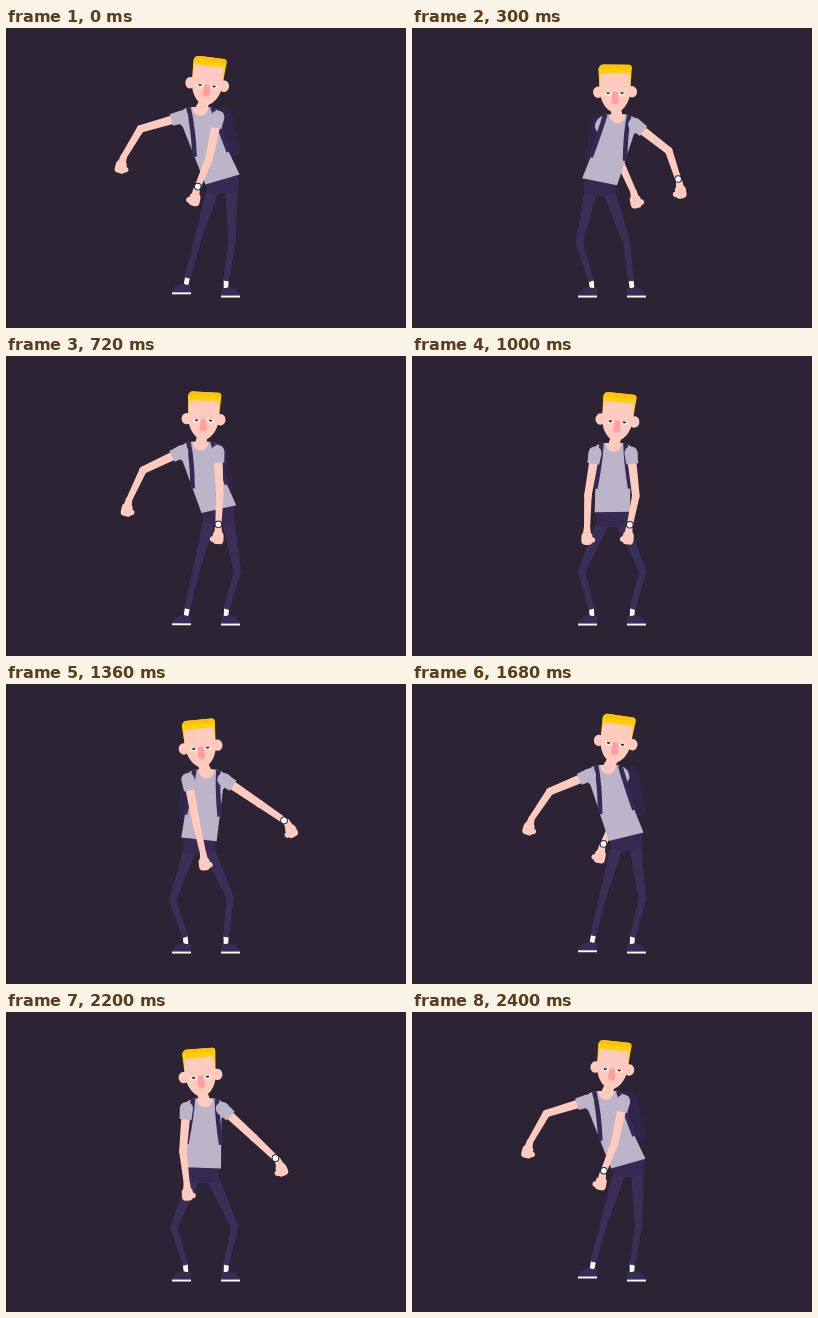
Animation, 400 px wide and 300 px high, one loop 2.42 s. Source, as an HTML page with a canvas:

```html
<!DOCTYPE html>
<html lang="en">
<head>
<meta charset="utf-8">
<title>Dance loop</title>
<style>
html, body { margin: 0; width: 100%; height: 100%; overflow: hidden; background: #2c2335; }
canvas { display: block; width: 400px; height: 300px; }
</style>
</head>
<body>
<canvas id="stage"></canvas>
<script>
const LOOP = 2420, SWINGS = 3;
const C = {
  bg: '#2c2335', skin: '#ffcbbf', nose: '#ff9fa2', hair: '#ffcf08', hairTop: '#ffc008',
  shirt: '#bcb4c8', leg: '#3a2f57', hips: '#352a51', pack: '#30264a', strap: '#342a53',
  shoe: '#372c56', dark: '#2b2237'
};

// Keys: [phase in degrees, upper arm, forearm]; angles from straight down, outward positive.
const WATCH_ARM = [[0, -12, -22], [25, -13, -25], [86, 6, -12], [134, 52, 18], [164, 56.5, 58],
  [200, 60, 62], [247, 56, 56], [321, 3, -2], [351, -12, -21]];
const PLAIN_ARM = [[0, 74, 31], [25, 71, 34], [60, 38, 26], [86, 10, 2], [134, -14, -12],
  [164, -36, -37], [200, -37, -39], [247, -11, -13], [284, 30, 2], [321, 64, 25], [351, 73, 30]];
const BOB = [[0, 0], [30, 2], [60, 6], [86, 8], [134, 7.5], [164, 1], [180, 0],
  [215, 3], [247, 6.5], [280, 8], [321, 6.8], [351, 0]];

const cvs = document.getElementById('stage');
const g = cvs.getContext('2d');
const dpr = window.devicePixelRatio || 1;
cvs.width = 400 * dpr;
cvs.height = 300 * dpr;

const rad = d => d * Math.PI / 180;
const cosd = d => Math.cos(rad(d));
const sind = d => Math.sin(rad(d));
const mix = (p, q, k) => [p[0] + (q[0] - p[0]) * k, p[1] + (q[1] - p[1]) * k];
const polar = (p, side, deg, len) => [p[0] + side * sind(deg) * len, p[1] + cosd(deg) * len];

// Smooth periodic curve through the keys, flat at turning points.
function sample(keys, phase, col) {
  const n = keys.length;
  const at = i => {
    const turn = Math.floor(i / n), k = keys[i - turn * n];
    return [k[0] + turn * 360, k[col]];
  };
  const slope = i => {
    const [a, b, c] = [at(i - 1), at(i), at(i + 1)];
    if ((b[1] - a[1]) * (c[1] - b[1]) <= 0) return 0;
    return (c[1] - a[1]) / (c[0] - a[0]);
  };
  let i = n - 1;
  while (keys[i][0] > phase) i--;
  const [x0, y0] = at(i), [x1, y1] = at(i + 1);
  const h = x1 - x0, u = (phase - x0) / h, v = 1 - u;
  return y0 * v * v * (1 + 2 * u) + y1 * u * u * (3 - 2 * u)
    + h * u * v * (slope(i) * v - slope(i + 1) * u);
}

function fill(color, draw) {
  g.fillStyle = color;
  g.beginPath();
  draw();
  g.fill();
}
function poly(color, pts) {
  fill(color, () => pts.forEach(p => g.lineTo(p[0], p[1])));
}
function oval(color, x, y, rx, ry = rx) {
  fill(color, () => g.ellipse(x, y, rx, ry, 0, 0, 7));
}
function limb(color, p, q, w0, w1) {
  const a = Math.atan2(q[1] - p[1], q[0] - p[0]);
  const nx = -Math.sin(a) / 2, ny = Math.cos(a) / 2;
  poly(color, [[p[0] + nx * w0, p[1] + ny * w0], [q[0] + nx * w1, q[1] + ny * w1],
    [q[0] - nx * w1, q[1] - ny * w1], [p[0] - nx * w0, p[1] - ny * w0]]);
}
function placed(x, y, deg, draw) {
  g.save();
  g.translate(x, y);
  g.rotate(rad(deg));
  draw();
  g.restore();
}

function arm(shoulder, side, upper, fore, watch) {
  const elbow = polar(shoulder, side, upper, 43);
  const wrist = polar(elbow, side, fore, 33);
  limb(C.skin, shoulder, elbow, 9, 7.5);
  oval(C.skin, elbow[0], elbow[1], 3.75);
  limb(C.skin, elbow, wrist, 7.5, 6);
  placed(wrist[0], wrist[1], -side * fore * 0.5, () => {
    fill(C.skin, () => g.roundRect(-5.5, 4, 11, 12.5, 4));
    limb(C.skin, [0, -2], [0, 7], 6, 8.5);
    oval(C.skin, -side * 5.2, 11.5, 3, 2.8);
  });
  if (watch) {
    const w = mix(elbow, wrist, 0.9);
    placed(w[0], w[1], -side * fore, () => {
      g.fillStyle = C.dark;
      g.fillRect(-4, -1.8, 8, 3.6);
    });
    oval(C.dark, w[0], w[1], 3.8);
    oval('#fff', w[0], w[1], 2.8);
  }
  oval(C.shirt, shoulder[0], shoulder[1], 6.6);
  limb(C.shirt, shoulder, polar(shoulder, side, upper, 11), 13, 12);
}

function leg(hip, side) {
  const A = 54.3, B = 42.2, x = 200 + side * 19.5;
  const reach = Math.hypot(x - hip[0], 256 - hip[1]);
  const lift = Math.max(0, reach - A - B); // a stretched leg pulls its foot up
  const foot = [x, 256 - lift];
  const dx = foot[0] - hip[0], dy = foot[1] - hip[1];
  const d = Math.min(Math.hypot(dx, dy), A + B - 0.01);
  const a = (d * d + A * A - B * B) / (2 * d);
  const dir = Math.atan2(dy, dx) - side * Math.acos(Math.min(1, a / A));
  const knee = [hip[0] + Math.cos(dir) * A, hip[1] + Math.sin(dir) * A];
  limb(C.leg, hip, knee, 12.5, 7.2);
  oval(C.leg, knee[0], knee[1], 3.6);
  limb('#fff', mix(knee, foot, 0.9), [x + side * 0.5, 260 - lift], 5, 4.6);
  limb(C.leg, knee, mix(knee, foot, 0.93), 7.2, 6);

  g.save();
  g.translate(200, -lift);
  g.scale(side, 1);
  fill(C.shoe, () => {
    g.moveTo(15.3, 259.5);
    g.quadraticCurveTo(19, 261, 23, 259);
    g.quadraticCurveTo(33, 261, 34, 268);
    g.lineTo(15, 268);
  });
  g.fillStyle = '#fff';
  g.fillRect(15, 267.6, 19, 1.9);
  g.restore();
}

function head(x, y, tilt) {
  placed(x, y, tilt, () => {
    oval(C.skin, -17, 0, 5, 5.7);
    oval(C.skin, 17, 0, 5, 5.7);
    const top = () => {
      g.quadraticCurveTo(-15, -28, -10, -27.5);
      g.lineTo(14, -27);
      g.quadraticCurveTo(17.5, -27, 17, -22.5);
    };
    fill(C.hair, () => {
      g.moveTo(-15.6, -5);
      g.lineTo(-16.3, -23);
      top();
      g.lineTo(15.6, -5);
    });
    fill(C.hairTop, () => {
      g.moveTo(-16, -23.5);
      top();
      g.quadraticCurveTo(0, -24, -16, -23.5);
    });
    fill(C.skin, () => {
      g.moveTo(-14.3, -18.5);
      g.lineTo(14.3, -18.5);
      g.lineTo(15.6, -5);
      g.bezierCurveTo(16, 9, 8, 20.5, 0, 20.5);
      g.bezierCurveTo(-8, 20.5, -16, 9, -15.6, -5);
    });
    for (const ex of [-7, 7]) {
      fill('#fff', () => g.ellipse(ex, 0.5, 3.5, 2.8, 0, 0, Math.PI));
      fill(C.dark, () => g.ellipse(ex, 0.5, 1.8, 1.8, 0, 0, Math.PI));
    }
    fill(C.nose, () => {
      g.moveTo(-2.6, 0);
      g.lineTo(2.6, 0);
      g.lineTo(3.6, 9);
      g.bezierCurveTo(3.6, 13.4, -3.6, 13.4, -3.6, 9);
    });
  });
}

function strap(from, to, bend) {
  g.strokeStyle = C.strap;
  g.lineWidth = 4.6;
  g.beginPath();
  g.moveTo(...from);
  g.quadraticCurveTo((from[0] + to[0]) / 2 + bend, (from[1] + to[1]) / 2 - 4, ...to);
  g.stroke();
}

function render(t) {
  const total = t / LOOP * 360 * SWINGS;
  const ph = total % 360;
  const sway = cosd(ph), bob = sample(BOB, ph, 1);
  const sink = 1 - sway * sway;
  const lean = -16 * sway;

  const hip = [199.5 + 17 * sway, 151.5 + 4.5 * sink];
  const sx = 199.5 + 2 * cosd(ph - 110) - 5 * sway;
  const top = 79 + bob, sy = top + 10;
  const corner = s => [hip[0] + s * 17.8 * cosd(lean), hip[1] + s * 17.8 * sind(lean)];
  const bl = corner(-1), br = corner(1);
  const tl = [sx - 17, sy + 10], tr = [sx + 17, sy + 10];

  // Each arm passes behind the back once per loop, reaching there sooner.
  const reach = start => {
    const u = total - start;
    return u > 0 && u < 110 ? 16 * Math.sin(Math.PI * u / 110) : 0;
  };
  const pose = (keys, extra) => [sample(keys, ph, 1) - extra, sample(keys, ph, 2) - extra * 0.8];
  const plainBack = total > 98 && total < 270;
  const watchBack = total > 638 && total < 810;
  const plain = () => arm([sx - 18, sy], -1, ...pose(PLAIN_ARM, reach(90)), false);
  const watch = () => arm([sx + 18, sy], 1, ...pose(WATCH_ARM, reach(630)), true);

  g.setTransform(dpr, 0, 0, dpr, 0, 0);
  g.fillStyle = C.bg;
  g.fillRect(0, 0, 400, 300);

  if (plainBack) plain();
  if (watchBack) watch();

  placed(199 + 17 * cosd(ph - 15), top + 27, -13 * sway, () =>
    fill(C.pack, () => g.roundRect(-15, -26, 30, 52, 8)));

  const hy = 160 + 5.5 * sink;
  leg([hip[0] - 9, hy], -1);
  leg([hip[0] + 9, hy], 1);
  poly(C.hips, [mix(bl, br, 0.03), mix(bl, br, 0.97),
    [hip[0] + 15.5, hy + 3], [hip[0] + 6, hy + 5.5],
    [hip[0] - 6, hy + 5.5], [hip[0] - 15.5, hy + 3]]);

  fill(C.shirt, () => {
    g.moveTo(sx - 11, top);
    g.quadraticCurveTo(sx - 22, top + 3, sx - 22, sy + 3);
    g.quadraticCurveTo(sx - 20, sy + 8, ...tl);
    g.lineTo(...bl);
    g.lineTo(...br);
    g.lineTo(...tr);
    g.quadraticCurveTo(sx + 20, sy + 8, sx + 22, sy + 3);
    g.quadraticCurveTo(sx + 22, top + 3, sx + 11, top);
  });
  strap([sx - 11.5, top], mix(tl, bl, 0.52), 2);
  strap([sx + 12.5, top], mix(tr, br, 0.52), -2);
  fill(C.skin, () => g.ellipse(sx + 0.5, top, 8, 9, 0, 0, Math.PI));

  const hx = 200 + 5.5 * cosd(ph - 78), headY = 56.5 + bob;
  limb(C.skin, [hx, headY + 12], [sx + 0.5, top + 3], 10, 11);

  if (!plainBack) plain();
  if (!watchBack) watch();
  head(hx, headY, 7.5 * cosd(ph - 38));
}

const start = performance.now();
function tick(now) {
  render(Math.max(0, now - start) % LOOP);
  requestAnimationFrame(tick);
}
render(0);
requestAnimationFrame(tick);
</script>
</body>
</html>
```
